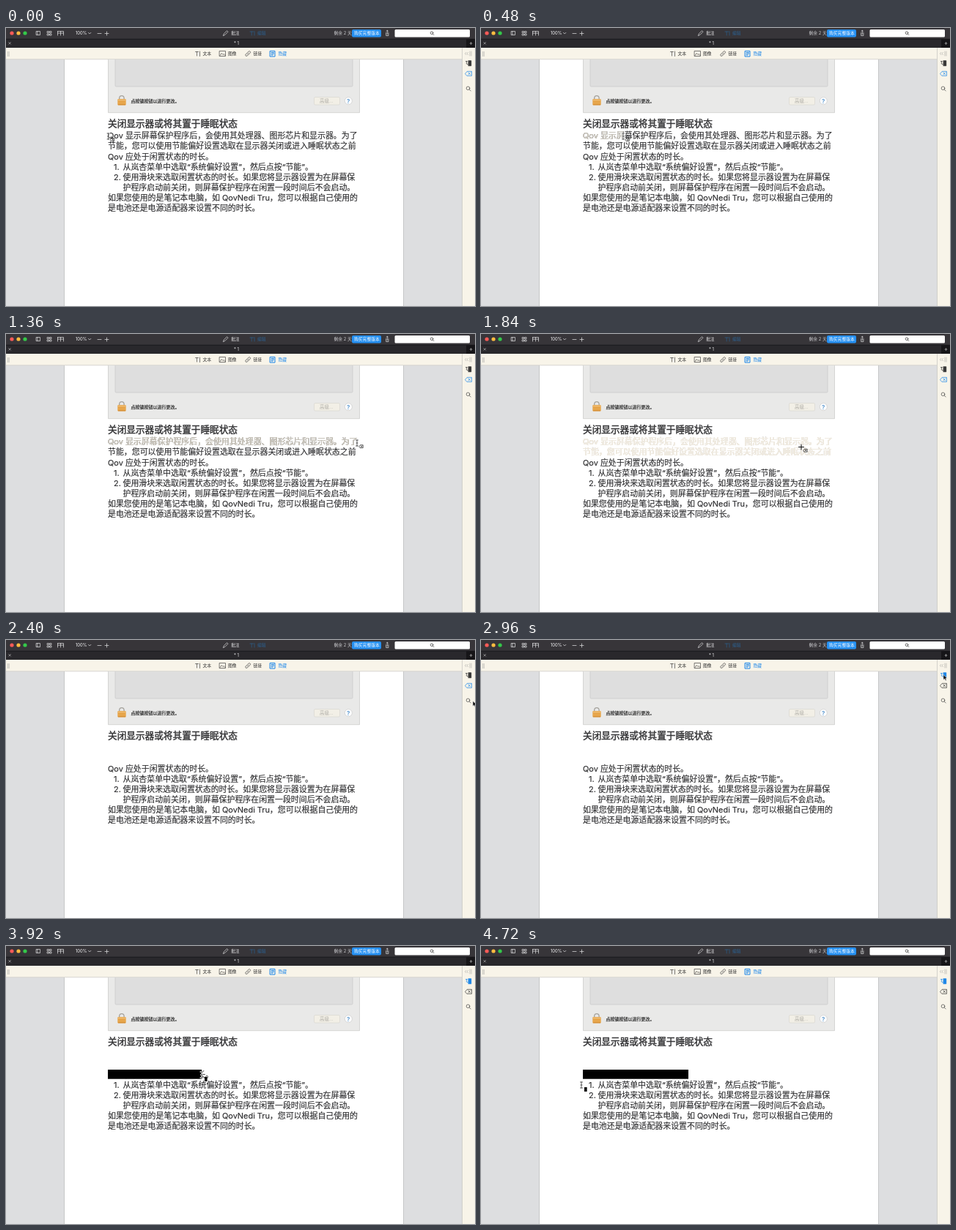
These frames come from a looping animation (640x380 px, 4.8 s). An HTML page:

```html
<!DOCTYPE html>
<html lang="zh-CN">
<head>
<meta charset="utf-8">
<title>PDF</title>
<style>
html, body { margin: 0; width: 100%; height: 100%; overflow: hidden; background: #fff; }
svg { display: block; width: 640px; height: 380px; isolation: isolate; }
text { font-family: Inter, "Noto Sans CJK SC", "Noto Sans CJK", sans-serif; white-space: pre; }
.ui { font-size: 5.8px; }
.body { font-size: 10.93px; fill: #2e2e30; stroke: #2e2e30; stroke-width: .16; }
.head { font-size: 12.65px; fill: #333335; stroke: #333335; stroke-width: .42; }
.line { fill: none; stroke-width: .7; stroke-linecap: round; stroke-linejoin: round; }
.veil { mix-blend-mode: lighten; }
#top { stroke: #e4e4e6; }
#bar { stroke: #444; }
</style>
</head>
<body>
<svg viewBox="0 0 640 380">
  <!-- page and side areas -->
  <rect width="640" height="380" fill="#dddee0"/>
  <rect x="80" y="43" width="462.5" height="337" fill="#fff"/>
  <path d="M79.5 43V380M542.5 43V380" stroke="#c6c7c8"/>

  <!-- title bar -->
  <rect width="640" height="15" fill="#373539"/>
  <rect y="15" width="640" height="12" fill="#29282c"/>
  <rect x="628" y="15" width="12" height="12" fill="#161518"/>
  <path d="M0 15.2H640" stroke="#161518" stroke-width=".8"/>
  <circle cx="8" cy="7" r="2.6" fill="#fc5b57"/>
  <circle cx="17" cy="7" r="2.6" fill="#fdbc40"/>
  <circle cx="26" cy="7" r="2.6" fill="#34c84a"/>
  <g id="top" class="line">
    <path d="M41.5 4.5h5v5h-5zM43 4.5v5M56.5 4.5h2v2h-2zM60 4.5h2v2h-2zM56.5 8h2v2h-2zM60 8h2v2h-2z"/>
    <path d="M70.5 4.5h8v5.5M70.5 4.5v5.5M74.5 4.5v5.5M70.5 7h8M112.500 6.300l1.700 1.700 1.700-1.700"/>
    <path d="M125 7.500h5M135 7.500h5M137.500 5v5"/>
    <path d="M296.500 10.200l1-2.500 4-4 1.500 1.500-4 4zM518.700 6.500v4h3.200v-4M520.300 8.500v-5.300M519.200 4.300l1.100-1.200 1.100 1.200"/>
    <path d="M3.800 19.500l2.600 2.600M6.400 19.500l-2.600 2.600M633 21h3M634.500 19.500v3" stroke="#bbb"/>
    <path d="M333 5h4.500M335.200 5v5M339 4.500v5.500" stroke="#2c608f"/>
  </g>
  <g class="ui" fill="#f0f0f2">
    <text x="95" y="9.300">100%</text>
    <text x="307" y="9.300">批注</text>
    <text x="343" y="9.300" fill="#2c608f">编辑</text>
    <text x="447.500" y="9.300" fill="#cfcfd2">剩余 2 天</text>
    <text x="311" y="23">* 1</text>
  </g>
  <rect x="472" y="2" width="40" height="10.500" rx="2" fill="#2590f2"/>
  <text class="ui" x="475" y="9.300" fill="#fff">购买完整版本</text>
  <rect x="530.500" y="2" width="102.500" height="10.500" rx="1.500" fill="#fff"/>
  <g class="line" stroke="#333"><circle cx="581" cy="6.700" r="1.800"/><path d="M582.400 8.100l1.500 1.500"/></g>

  <!-- tool bar -->
  <rect y="27" width="640" height="15.500" fill="#f8f4e9"/>
  <path d="M0 42.700H622" stroke="#d4d2ca" stroke-width=".7"/>
  <path d="M2.500 32v7M4.200 32v7" stroke="#b9b8b3" stroke-width=".8"/>
  <g id="bar" class="line">
    <path d="M258.500 32.500h4M260.500 32.500v5.500M264.500 32v6.500"/>
    <path d="M291.500 31.500h8v7h-8zM292 37.500l2.300-3 1.800 2 1.200-1 1.800 2"/>
    <path d="M329.500 33.500l1.800-1.600q1.200-.7 2 .4t-.2 2l-1.800 1.700M330.800 36.400l-1.800 1.700q-1.200.7-2-.3t.2-2l1.600-1.600M329.200 36l2-2"/>
    <path d="M360.500 31.500h6.500v7.500h-6.500zM362 33.500h3.500M362 35.200h3.500M362 37h2" stroke="#1884e8" stroke-width="1"/>
  </g>
  <g class="ui" fill="#333">
    <text x="268.500" y="37.300">文本</text>
    <text x="303" y="37.300">图像</text>
    <text x="337.500" y="37.300">链接</text>
    <text x="371.500" y="37.300" fill="#1884e8">隐藏</text>
  </g>

  <!-- side bar -->
  <rect x="622.500" y="27" width="17.500" height="353" fill="#f8f4e9"/>
  <path d="M622.500 27V380" stroke="#c9c8c3" stroke-width=".8"/>
  <g class="line" stroke="#b2b1ad">
    <path d="M628 33.300l-1.700 1.700 1.700 1.700M630.500 33.300l-1.700 1.700 1.700 1.700M633 32v6M635 32v6"/>
  </g>
  <g id="redact" class="line">
    <path d="M627.500 45.500h1.800M628.400 45.500v3.500M629.500 49.500h.8"/>
    <rect x="631.200" y="44.700" width="3.600" height="7" fill="currentColor"/>
  </g>
  <g id="erase" class="line">
    <path d="M626.800 62.300l2.400-3h6.300v6h-6.300zM630.800 60.800l3 3M633.800 60.800l-3 3"/>
  </g>
  <g class="line" stroke="#444"><circle cx="630.500" cy="82.300" r="2.300"/><path d="M632.200 84l2 2"/></g>

  <!-- settings panel -->
  <rect x="139" y="43" width="344" height="73" fill="#e9e9e8"/>
  <path d="M139.500 43V115.700H482.500V43" fill="none" stroke="#d0d0cf" stroke-width=".8"/>
  <path d="M149 43V78.500q0 1.500 1.500 1.500H471.500q1.500 0 1.500-1.500V43" fill="#dedede" stroke="#cbcbcb" stroke-width=".8"/>
  <path d="M154.700 98v-2.200a3.200 3.200 0 0 1 6.400 0V98" fill="none" stroke="#a5a29c" stroke-width="1.300"/>
  <rect x="152.300" y="97" width="11.400" height="8.500" rx="1" fill="#e7a64c"/>
  <path d="M153 98.500h10" stroke="#f0c583"/>
  <path d="M153 104.800h10" stroke="#c98229" stroke-width=".8"/>
  <text x="170.500" y="102.400" font-size="6" fill="#222" stroke="#222" stroke-width=".2">点按锁按钮以进行更改。</text>
  <rect x="420.500" y="94.500" width="35" height="10.500" rx="1.500" fill="#f2efe6" stroke="#d6d4cd" stroke-width=".6"/>
  <text x="428" y="102.200" font-size="6.400" fill="#aeaca6">高级...</text>
  <circle cx="467.300" cy="99.600" r="5" fill="#fff" stroke="#c2c2c2" stroke-width=".6"/>
  <text x="465" y="102.500" font-size="8" font-weight="500" fill="#2878c0">?</text>

  <!-- document text -->
  <text class="head" x="139" y="135.300">关闭显示器或将其置于睡眠状态</text>
  <g class="body">
    <g id="gone">
      <text x="139" y="151">Qov 显示屏幕保护程序后，会使用其处理器、图形芯片和显示器。为了</text>
      <text x="139" y="165.200">节能，您可以使用节能偏好设置选取在显示器关闭或进入睡眠状态之前</text>
    </g>
    <text x="139" y="179.600">Qov 应处于闲置状态的时长。</text>
    <text x="147" y="194.100">1.</text>
    <text x="159.500" y="194.100">从岚杏菜单中选取“系统偏好设置”，然后点按“节能”。</text>
    <text x="147" y="207.700">2.</text>
    <text x="159.500" y="207.700">使用滑块来选取闲置状态的时长。如果您将显示器设置为在屏幕保</text>
    <text x="159.500" y="221.500">护程序启动前关闭，则屏幕保护程序在闲置一段时间后不会启动。</text>
    <text x="139" y="235.500">如果您使用的是笔记本电脑，如 QovNedi Tru，您可以根据自己使用的</text>
    <text x="139" y="249.800">是电池还是电源适配器来设置不同的时长。</text>
  </g>
  <rect id="veil1" class="veil" x="138" y="140.500" height="14"/>
  <rect id="veil2" class="veil" x="138" y="154.500" height="14"/>
  <rect id="block" x="139" y="169" height="12.700" fill="#000"/>

  <!-- pointer -->
  <g id="pointer">
    <g id="beam" class="line">
      <path d="M-1.500-4h3M0-4v8M-1.500 4h3M-1 0h2" stroke="#fff" stroke-width="2"/>
      <path d="M-1.500-4h3M0-4v8M-1.500 4h3M-1 0h2" stroke="#222"/>
    </g>
    <g id="cross" class="line">
      <path d="M-3.500 0h7M0-3.500v7" stroke="#fff" stroke-width="2.200"/>
      <path d="M-3.500 0h7M0-3.500v7" stroke="#111" stroke-width="1.100"/>
    </g>
    <path id="arrow" d="M-1-2.500v7l1.700-1.600 1.200 2.600 1.300-.6-1.200-2.500h2.200z" fill="#111" stroke="#fff" stroke-width=".5"/>
    <path id="tagErase" class="line" d="M3 4.700l1.400-2h3.800v4h-3.800zM5.200 3.700l2 2M7.200 3.700l-2 2" stroke="#222"/>
    <rect id="tagBlock" x="4" y="3" width="3.600" height="6" fill="#000"/>
  </g>
</svg>
<script>
const LOOP = 4800, STEP = 80;
const RELEASE = 1600, CLEARED = 2080, SWITCH = 2720, MARK = 3520, MARKED = 4000;
const $ = id => document.getElementById(id);

// pointer stops: time, x, y
const path = [
  [0, 139.5, 148], [240, 139.5, 148], [880, 285, 148], [1360, 479, 149],
  [1440, 482, 159], [1600, 479, 160], [1840, 437, 154.5], [2240, 500, 112],
  [2400, 638, 86], [2720, 632, 50], [2960, 632, 50], [3360, 145, 173],
  [3440, 137, 175], [3520, 137, 175], [3920, 267, 176], [4000, 283, 176],
  [4160, 285, 177], [4640, 137, 190], [4800, 137, 190]
];
const veilTone = [
  [0, 198, 194, 185], [RELEASE, 198, 194, 185],
  [1840, 239, 234, 224], [CLEARED, 255, 255, 255]
];

function at(keys, t) {
  const i = keys.findIndex(k => k[0] > t);
  if (i < 0) return keys[keys.length - 1].slice(1);
  const a = keys[i - 1], b = keys[i], p = (t - a[0]) / (b[0] - a[0]);
  return a.slice(1).map((v, n) => v + (b[n + 1] - v) * p);
}

const show = (id, on) => $(id).style.display = on ? '' : 'none';
const wide = (id, to, from) => $(id).setAttribute('width', Math.max(0, to - from));

function tint(id, on) {
  const color = on ? '#1884e8' : '#333';
  $(id).style.stroke = color;
  $(id).style.color = color;
}

function draw(t) {
  const [x, y] = at(path, t);

  // erased lines
  const tone = `rgb(${at(veilTone, t).map(Math.round)})`;
  const second = t >= 1400;
  wide('veil1', second ? 483 : t > 240 ? x : 0, 138);
  wide('veil2', t >= RELEASE ? 483 : second ? x : 0, 138);
  $('veil1').style.fill = $('veil2').style.fill = tone;
  show('gone', t < CLEARED);

  // blacked-out line
  wide('block', t < MARK ? 0 : t < MARKED ? x : 283, 139);

  const blocking = t >= SWITCH;
  tint('redact', blocking);
  tint('erase', !blocking);

  const arrow = x > 610;
  const beam = !arrow && (t < RELEASE || (t >= 3360 && t < MARKED) || t >= 4560);
  show('arrow', arrow);
  show('beam', beam);
  show('cross', !arrow && !beam);
  show('tagErase', !arrow && !blocking);
  show('tagBlock', !arrow && blocking);
  $('pointer').setAttribute('transform', `translate(${x} ${y})`);
}

let start;
function tick(now) {
  start ??= now;
  draw(Math.floor((now - start) % LOOP / STEP) * STEP);
  requestAnimationFrame(tick);
}
draw(0);
requestAnimationFrame(tick);
</script>
</body>
</html>
```
